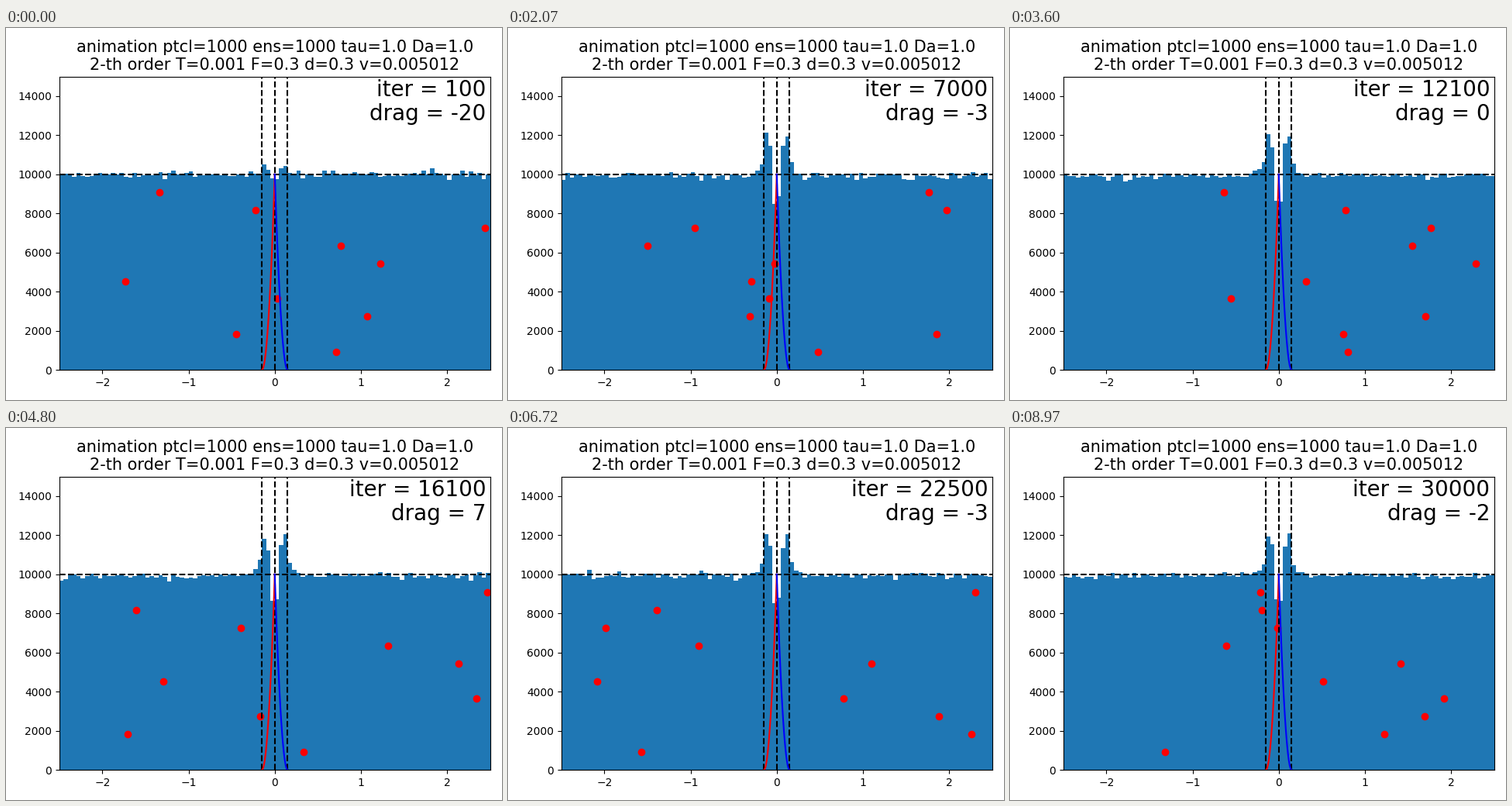
These frames come from a looping animation (640 by 480 pixels, 9 s). A matplotlib script:

```python
import numpy as np
import matplotlib.pyplot as plt
from matplotlib.animation import FuncAnimation

FRAMES, INTERVAL = 300, 30
HALF, WALL, LEVEL = 2.5, 0.15, 10000
BINS, DT = 100, 0.1
START = [0.71, -0.45, 1.07, 0.03, -1.73, 1.22, 0.77, 2.44, -0.22, -1.34]

rng = np.random.default_rng(7)
# Share of the initial state still left at each frame
memory = np.exp(-np.arange(FRAMES) / 3)


def particle_paths():
    """Random walks on a ring with Ornstein-Uhlenbeck velocity."""
    keep = np.exp(-DT)
    kick = np.sqrt(1 - keep**2)
    vel = rng.normal(size=len(START))
    path = [np.array(START)]
    for _ in range(FRAMES - 1):
        path.append(path[-1] + DT * vel)
        vel = keep * vel + kick * rng.normal(size=len(START))
    return (np.array(path) + HALF) % (2 * HALF) - HALF


def histograms(edges):
    """Flat density with a dip at the centre and crowding at the walls."""
    dist = np.abs(edges[:-1] + edges[1:]) / 2
    shape = np.interp(dist, [0.025, 0.075, 0.125, 0.175, 0.225, 0.3],
                      [-1240, 1490, 2040, 660, 190, 0])
    shape -= shape.mean()
    growth = 1 - 0.8 * memory[:, None]
    return LEVEL + growth * shape + rng.normal(0, 95, (FRAMES, BINS))


edges = np.linspace(-HALF, HALF, BINS + 1)
heights = LEVEL * np.arange(1, 11) / 11
paths = particle_paths()
counts = histograms(edges)
drag = -20 * memory + (1 - memory) * rng.normal(0, 7, FRAMES)

fig, ax = plt.subplots(figsize=(6.4, 4.8), dpi=100)
ax.set_title("animation ptcl=1000 ens=1000 tau=1.0 Da=1.0\n"
             "2-th order T=0.001 F=0.3 d=0.3 v=0.005012", fontsize=15)

bars = ax.stairs(counts[0], edges, fill=True, color="C0")
dots = ax.scatter(paths[0], heights, color="red")

for x in (-WALL, 0, WALL):
    ax.axvline(x, color="black", ls="--")
ax.axhline(LEVEL, color="black", ls="--")

ramp = np.linspace(0, WALL, 50)
well = LEVEL * (1 - ramp / WALL) ** 2
ax.plot(-ramp, well, color="red")
ax.plot(ramp, well, color="blue")


def corner_text(y):
    return ax.text(0.99, y, "", transform=ax.transAxes,
                   ha="right", va="top", fontsize=20)


iter_text = corner_text(0.99)
drag_text = corner_text(0.91)
ax.set_xlim(-HALF, HALF)
ax.set_ylim(0, 15000)
fig.tight_layout()


def update(i):
    bars.set_data(values=counts[i])
    dots.set_offsets(np.column_stack([paths[i], heights]))
    iter_text.set_text(f"iter = {100 * (i + 1)}")
    drag_text.set_text(f"drag = {round(drag[i])}")
    return bars, dots, iter_text, drag_text


anim = FuncAnimation(fig, update, frames=FRAMES, interval=INTERVAL,
                     repeat=True, repeat_delay=0)
plt.show()
```
